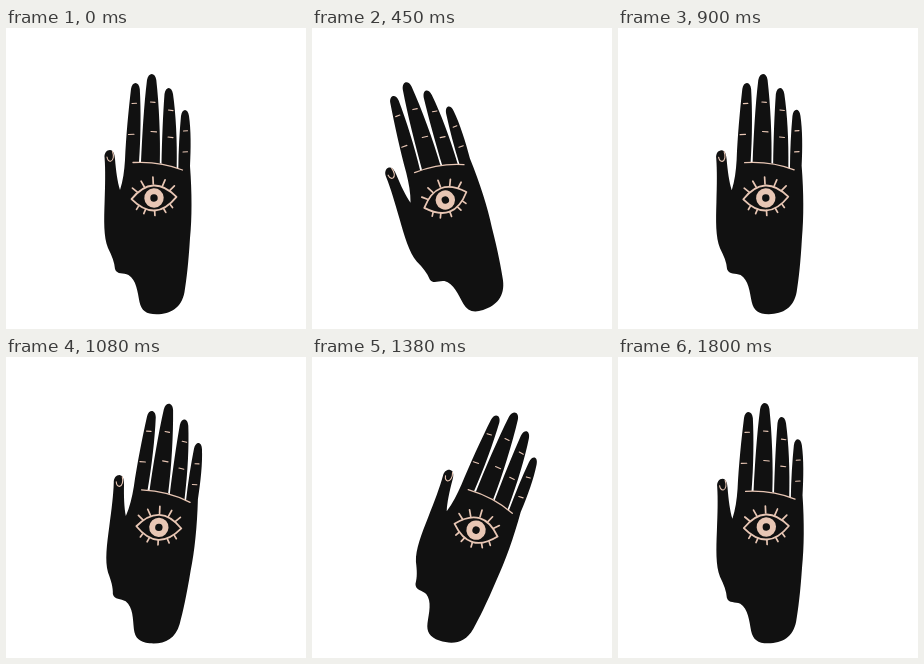
Write an HTML page that moves like this. It is 300 by 301 pixels and loops after 1.83 s.

```html
<!DOCTYPE html>
<html lang="en">
<head>
<meta charset="utf-8">
<title>Waving hand</title>
<style>
  html, body { margin: 0; width: 100%; height: 100%; overflow: hidden; background: #fff; }
  svg { display: block; width: 100vw; height: 100vh; }
  .line { fill: none; stroke: #e8c6b4; stroke-linecap: round; stroke-linejoin: round; }
</style>
</head>
<body>
<svg viewBox="0 0 300 301">
  <g id="hand">
    <path fill="#111" d="
      M98.6 130 C98 125.5 100.5 122 104 122 C107.3 122 108.6 126 109 131
      C110 143 111.5 154 114 162 C117 153 118.3 143 119 132
      C120 109 122.5 82 125 61 C126 53 133 53 133.8 61
      C135 82 134.8 110 133 134 L135 134
      C136 110 138 76 141 52 C142.3 44 149.3 44 150.3 52
      C153 76 154.6 110 153.8 135 L155.5 136
      C156 112 157 86 158.5 66 C159.6 58 165.8 58 167 66
      C169.8 86 171.3 112 170.7 140 L172.3 141
      C172.5 122 173.5 104 175 88 C176 80 182 80 183 88
      C185 102 185 120 184 138
      C186 165 186 190 184 210 C182.5 235 180.5 252 178.5 264
      C175.5 280 165 286 150.5 286.3 C140 286.3 135.5 282.5 133.5 274
      C131.5 264 130.5 252 122.5 247 C117.5 244.5 111 247 109 241
      C108.5 234 106 228 102 220 C97.5 209 98 192 98.6 174
      C99.2 157 99.5 142 98.6 130Z"/>
    <path class="line" stroke-width="1.1" d="M106.5 123.5 C108.2 128 107.4 132.5 104.7 133.2 C102.6 133.4 101.4 131.4 101 129"/>
    <path class="line" stroke-width="1.3" d="M127 134.5 Q154 133 176.5 142"/>
    <path class="line" stroke-width="1.1" d="
      M126 75.5 l4.5 -.2 M144.5 74 l4.5 .4 M162.5 82 l4.5 .6 M177.5 103 l4 -.2
      M122.5 106.5 l5.5 -.2 M145 103.5 l5.5 .4 M162 109 l5 .6 M177 124 l4.5 -.2"/>
    <g transform="translate(148 170) rotate(-3)">
      <path class="line" stroke-width="1.8" d="M-22.5 0 Q0 -25 22.5 0 Q0 25 -22.5 0Z"/>
      <circle r="6.7" fill="none" stroke="#e8c6b4" stroke-width="6"/>
      <path class="line" stroke-width="1.7" d="M0 -21 V-14 M0 12.5 V17.5"/>
      <path id="lashes" class="line" stroke-width="1.7" d="
        M-12 -17.5 L-9 -11.5 M-21 -11 L-16 -6.5
        M-9 11 L-11 15 M-16 7.5 L-18 10.5"/>
      <use href="#lashes" transform="scale(-1 1)"/>
    </g>
  </g>
</svg>
<script>
  const hand = document.getElementById("hand");
  const LOOP = 1830, STEP = 30;
  const PIVOT = "147 218";
  // Each key is [time in ms, angle in degrees].
  const KEYS = [[50, 0], [470, -17.8], [935, 0], [1335, 20], [1845, 0]];

  const ease = u => (1 - Math.cos(Math.PI * u)) / 2;

  function angleAt(t) {
    if (t < 90) return 0;
    const i = KEYS.findIndex(key => t < key[0]);
    const [t0, a0] = KEYS[i - 1], [t1, a1] = KEYS[i];
    return a0 + (a1 - a0) * ease((t - t0) / (t1 - t0));
  }

  function draw(time) {
    const t = Math.floor(time % LOOP / STEP) * STEP;
    hand.setAttribute("transform", `rotate(${angleAt(t)} ${PIVOT})`);
  }

  const start = performance.now();
  function tick() {
    draw(performance.now() - start);
    requestAnimationFrame(tick);
  }
  draw(0);
  requestAnimationFrame(tick);
</script>
</body>
</html>
```
